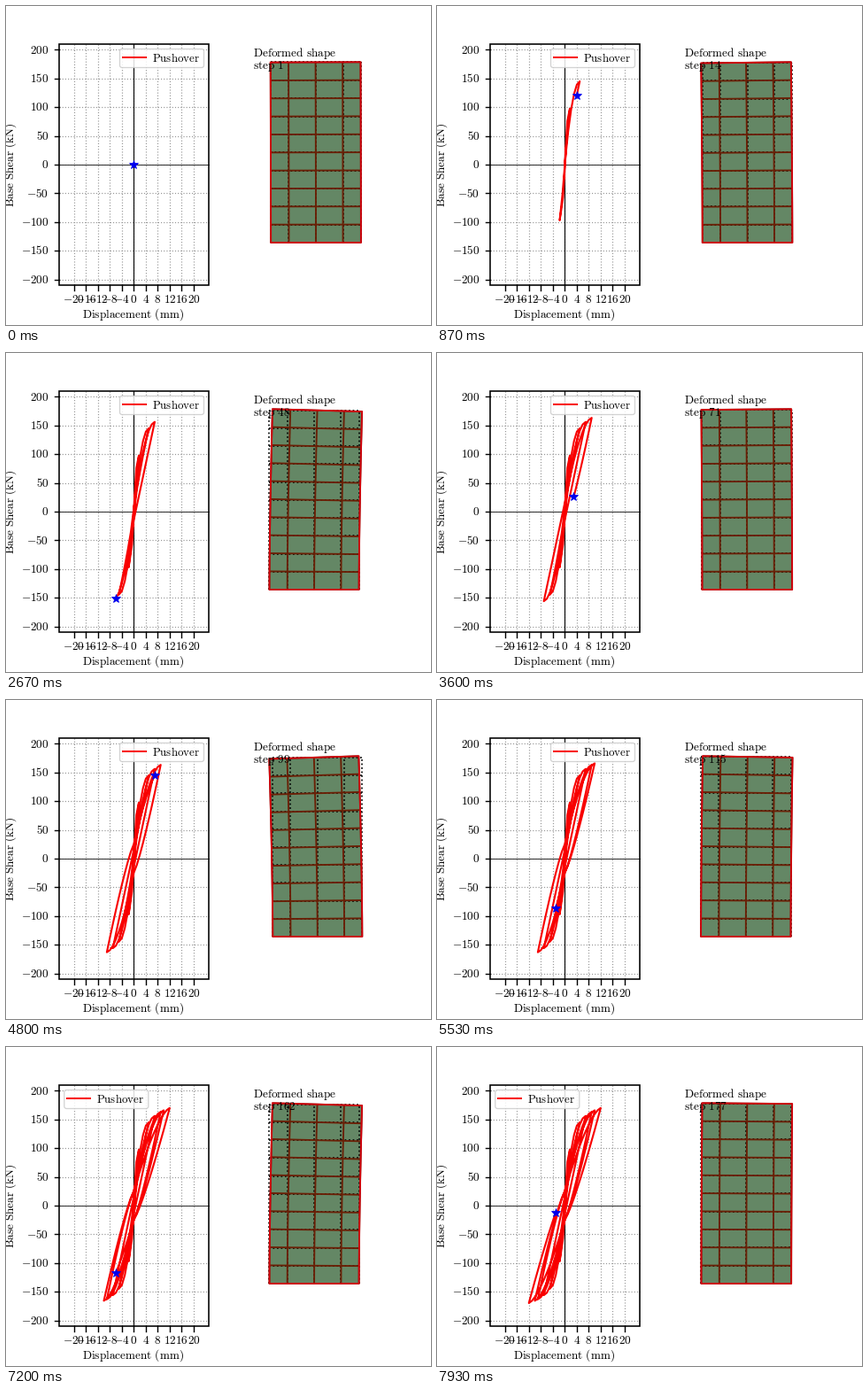
A matplotlib script for the animation above (8000 ms loop, 480 px wide and 360 px high).

```python
import numpy as np
import matplotlib.pyplot as plt
from matplotlib.animation import FuncAnimation
from matplotlib.collections import LineCollection
from matplotlib.patches import FancyBboxPatch, Polygon, Rectangle

plt.rcParams["mathtext.fontset"] = "cm"

W, H, DPI = 480, 360, 100
PT = 72 / DPI            # points per pixel
FRAMES, LOOP = 120, 8000

# Plot box in pixels and its data scale
LEFT, RIGHT, TOP, BOTTOM = 60, 229, 43, 315
X0, Y0 = 144.3, 178.9
SX, SY = 3.38, 0.648

AMPLITUDES = [1.7, 5, 7, 9, 10, 12, 13]   # cyclic displacement peaks, mm


def envelope(d):
    return d / (0.0087 + 0.00516 * abs(d))


def leg(start, end):
    """One loading leg in steps of about 1 mm: unload to zero, then reload."""
    p, a = abs(start), abs(end)
    mid = np.sign(end) * np.clip(5 * (p - 4), 0, 25)
    unload = np.clip(0.3 + 0.1 * p, 0.8, 1.2)
    reload = 2.3 - 0.07 * a
    d = np.linspace(start, end, round(a + p) + 1)[1:]
    back = np.clip(d / start, 0, 1) if start else np.zeros_like(d)
    ahead = np.clip(d / end, 0, 1)
    f = (mid + (envelope(start) - mid) * back ** unload
         + (envelope(end) - mid) * (1 - (1 - ahead) ** reload))
    return d, f


def hysteresis():
    """Displacement and shear at every load step."""
    peaks = [0.0] + [s * a for a in AMPLITUDES for s in (1, -1)]
    legs = [leg(a, b) for a, b in zip(peaks, peaks[1:])]
    return [np.concatenate([[0.0], *part]) for part in zip(*legs)]


disp, shear = hysteresis()
xs, ys = X0 + SX * disp, Y0 - SY * shear


def step_at(frame):
    return int(round(np.interp(frame, [0, 26, 54, 72, 92, 108, 119],
                               [1, 26, 71, 99, 131, 162, 178])))


fig = plt.figure(figsize=(W / DPI, H / DPI), dpi=DPI, facecolor="white")
ax = fig.add_axes([0, 0, 1, 1])
ax.set_xlim(0, W)
ax.set_ylim(H, 0)
ax.axis("off")


def line(x, y, color="black", width=1.0, z=2, **kw):
    return ax.plot(x, y, color=color, lw=width * PT, zorder=z, **kw)[0]


def roman(s):
    return r"$\mathrm{" + s.replace(" ", r"\ ") + "}$"


def text(x, y, s, size=13.3, **kw):
    return ax.text(x, y, s, fontsize=size * PT, color="black", zorder=8,
                   va="baseline", rotation_mode="anchor", **kw)


def draw_axes():
    dots = dict(color="#9a9a9a", width=1.2, z=1, linestyle=(0, (1, 1.65)))
    for v in range(-20, 21, 4):
        x = X0 + SX * v
        line([x, x], [TOP, BOTTOM], **dots)
        line([x, x], [BOTTOM, BOTTOM + 5.5], width=1.4)
        text(x, 335, f"${v}$", ha="center")
    for v in range(-200, 201, 50):
        y = Y0 - SY * v
        line([LEFT, RIGHT], [y, y], **dots)
        line([LEFT - 5.5, LEFT], [y, y], width=1.4)
        text(48.4, y + 4.3, f"${v}$", ha="right")
    line([X0, X0], [TOP, BOTTOM], width=1.1)
    line([LEFT, RIGHT], [Y0, Y0], color="#303030", width=1.0)
    ax.add_patch(Rectangle((LEFT, TOP), RIGHT - LEFT, BOTTOM - TOP, fill=False,
                           ec="black", lw=1.6 * PT, zorder=5))
    text(143.7, 352, roman("Displacement (mm)"), ha="center")
    text(9, 179.5, roman("Base Shear (kN)"), ha="center", rotation=90)
    text(278.9, 57.2, roman("Deformed shape"))


draw_axes()
curve = line([], [], "#f80000", 2.1, 3, solid_joinstyle="round")
star, = ax.plot([], [], "*", color="#0000ee", ms=10.5 * PT, mew=0.8 * PT, zorder=4)
label = text(278.9, 71.2, "")

box = FancyBboxPatch((0, 48.5), 95, 21, boxstyle="round,pad=0,rounding_size=2.6",
                     fc="white", ec="#cccccc", alpha=0.85, lw=1.3 * PT, zorder=6)
ax.add_patch(box)
key = line([0, 26], [58.4, 58.4], "#f80000", 2.0, 7)
key_text = text(0, 62.6, roman("Pushover"), 12.9)


def place_legend(x):
    box.set_x(x)
    key.set_xdata([x + 3.5, x + 29.5])
    key_text.set_x(x + 36.6)


# Wall mesh: unit height, half as wide
COLS = 0.5 * np.array([0, 0.2, 0.5, 0.8, 1.0])
GX, GY = np.meshgrid(COLS, np.linspace(0, 1, 11))
MESH_H, MESH_CX, MESH_BOTTOM = 203.7, 349.8, 267.0

fill = Polygon([[0, 0]], fc="#648765", ec="none", zorder=1.5)
rest = LineCollection([], colors="black", linewidths=1.7 * PT,
                      linestyles=[(0, (1, 1.65))], zorder=2)
inner = LineCollection([], colors="#6a2006", linewidths=1.9 * PT, zorder=2.5)
edge = Polygon([[0, 0]], fill=False, ec="#d4000c", lw=1.8 * PT, zorder=3)
for patch in (fill, edge):
    ax.add_patch(patch)
for lines in (rest, inner):
    ax.add_collection(lines, autolim=False)


def deform(d):
    """Cantilever bending; the view is refitted to the moved shape."""
    top = -0.5 * d / MESH_H
    x = GX + top * GY ** 1.6
    y = GY - (GX - 0.25) * top * 1.6 * GY ** 0.6
    lo, hi = min(x.min(), 0), max(x.max(), 0.5)
    scale = MESH_H / max(y.max(), 1)

    def place(u, v):
        return np.dstack([MESH_CX + scale * (u - (lo + hi) / 2),
                          MESH_BOTTOM - scale * v])

    return place(x, y), place(GX, GY)


def outline(p):
    return np.vstack([p[0], p[1:, -1], p[-1, -2::-1], p[-2:0:-1, 0]])


def grid_lines(p):
    return [*p, *p.swapaxes(0, 1)]


def update(frame):
    step = step_at(frame)
    curve.set_data(xs[:step], ys[:step])
    star.set_data([xs[step - 1]], [ys[step - 1]])
    label.set_text(roman(f"step {step}"))
    # The legend makes way once the curve would reach it
    place_legend(65.8 if shear[:step].max() > 168 else 128.5)

    mesh, still = deform(disp[step])
    for patch in (fill, edge):
        patch.set_xy(outline(mesh))
    inner.set_segments(grid_lines(mesh))
    rest.set_segments(grid_lines(still))
    return curve, star, label, box, key, key_text, fill, edge, inner, rest


anim = FuncAnimation(fig, update, frames=FRAMES, interval=LOOP / FRAMES,
                     init_func=lambda: update(0), repeat=True, repeat_delay=0,
                     blit=False)
plt.show()
```
